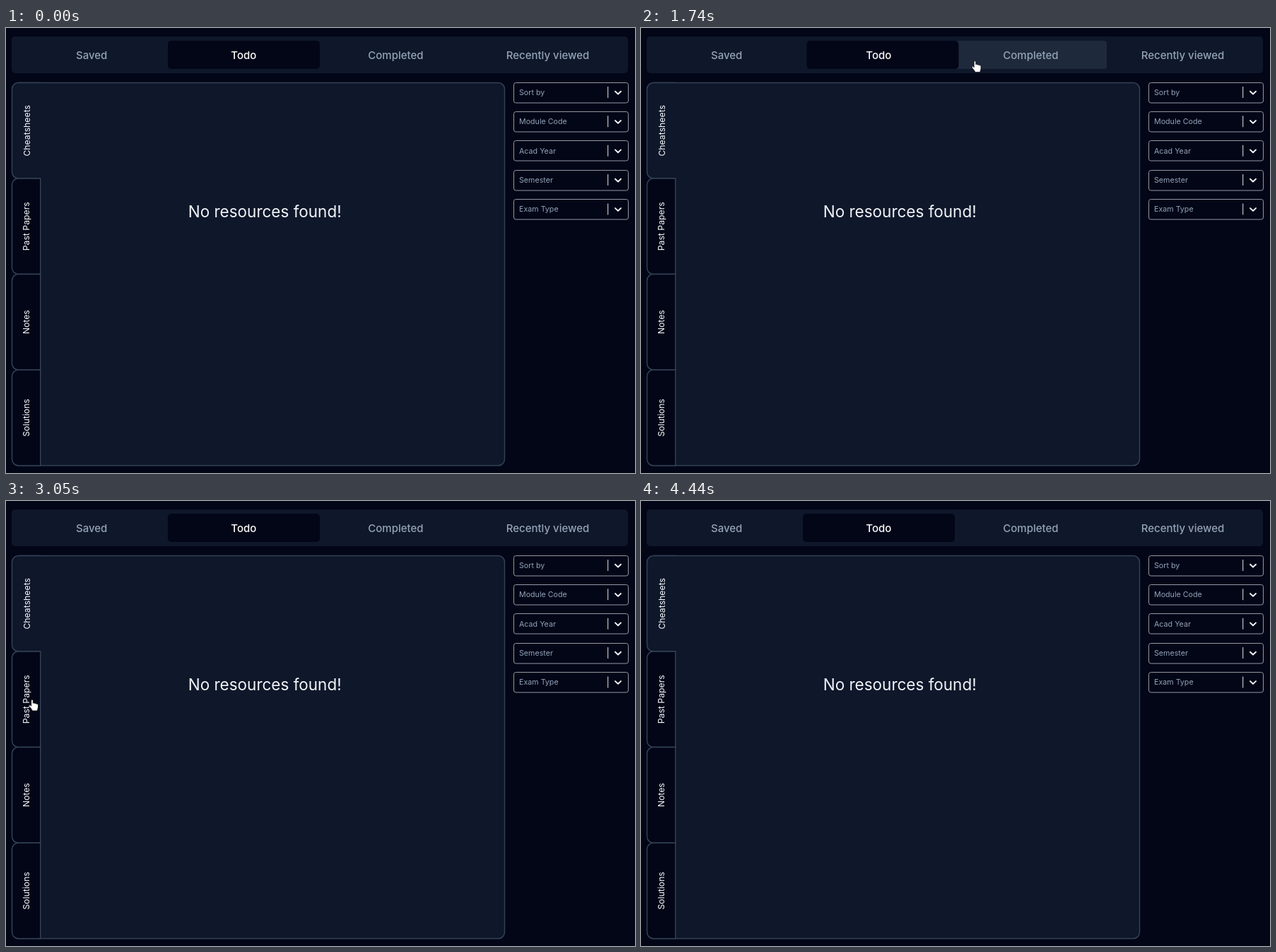
Animation of 890 by 630 pixels, one loop 5.11 s. Source, as an HTML page:

```html
<!DOCTYPE html>
<html lang="en">
<head>
<meta charset="utf-8">
<title>Resource tabs</title>
<style>
  html, body { margin: 0; width: 100%; height: 100%; overflow: hidden; background: #020617; }
  svg { display: block; width: 890px; height: 630px; font-family: Inter, sans-serif; }
</style>
</head>
<body>
<svg id="stage" viewBox="0 0 890 630"></svg>
<script>
const LOOP = 5110;
const PAGE = '#020617', PANEL = '#0f172a', HOVER = '#1e293b', LINE = '#334155';
const GREY = [148, 163, 184], WHITE = [255, 255, 255];
const stage = document.getElementById('stage');

function add(tag, attrs, parent = stage) {
  const el = document.createElementNS('http://www.w3.org/2000/svg', tag);
  set(el, attrs);
  parent.appendChild(el);
  return el;
}
function set(el, attrs) {
  for (const k in attrs) el.setAttribute(k, attrs[k]);
}
function label(str, attrs) {
  const el = add('text', attrs);
  el.textContent = str;
  return el;
}

// Top bar
add('rect', { x: 8, y: 12, width: 872, height: 52, rx: 5, fill: PANEL });
const hoverBox = [229, 444].map(x =>
  add('rect', { x, y: 18, width: 215, height: 40, rx: 4, fill: HOVER, opacity: 0 }));
const pill = add('rect', { x: 229, y: 18, width: 215, height: 40, rx: 5, fill: PAGE });
const tabText = ['Saved', 'Todo', 'Completed', 'Recently viewed'].map((s, i) =>
  label(s, { x: 121.2 + i * 215.1, y: 43.8, 'font-size': 15, 'font-weight': 500, 'text-anchor': 'middle', fill: `rgb(${GREY})` }));

// Main panel
add('rect', { x: 8.5, y: 77.5, width: 697, height: 542, rx: 9, fill: PANEL, stroke: LINE, 'stroke-width': 1.5 });
label('No resources found!', { x: 366.2, y: 268.2, 'font-size': 22.5, 'text-anchor': 'middle', fill: '#f1f5f9' });

// Side tabs
const sideTabs = ['Cheatsheets', 'Past Papers', 'Notes', 'Solutions'].map((s, i) => {
  const top = 77.5 + i * 135.5, bottom = top + 135.5;
  add('rect', { x: 7, y: top, width: 12, height: 135.5, fill: PAGE });
  const outline = `M49 ${top}H17.5a9 9 0 0 0 -9 9V${bottom - 9}a9 9 0 0 0 9 9H49`;
  const shape = add('path', { d: outline, stroke: LINE, 'stroke-width': 1.5 });
  const edge = add('path', { d: `M48.7 ${top - 0.7}V${bottom + 0.7}`, stroke: LINE, 'stroke-width': 1.5 });
  const text = label(s, { 'font-size': 12.25, 'text-anchor': 'middle', fill: '#f8fafc' });
  return { shape, edge, text, mid: top + 67.8 };
});

// Filters
['Sort by', 'Module Code', 'Acad Year', 'Semester', 'Exam Type'].forEach((s, i) => {
  const y = 91 + i * 41.35;
  const top = Math.round(y - 14.5) + 0.5;
  add('rect', { x: 718.5, y: top, width: 162, height: 28.5, rx: 3, fill: PAGE, stroke: '#a4a9b3', 'stroke-width': 0.9 });
  label(s, { x: 726, y: y + 3.9, 'font-size': 10.7, fill: '#94a3b8' });
  add('path', { d: `M851.7 ${y - 8}v16`, stroke: '#cbd5e1', 'stroke-width': 1.1 });
  add('path', { d: `M862 ${y - 1.3}l4 3.8l4 -3.8`, fill: 'none', stroke: '#f8fafc', 'stroke-width': 1.9, 'stroke-linecap': 'round', 'stroke-linejoin': 'round' });
});

// Pointer, drawn from its top left corner
const pointer = add('g', { fill: '#fff', stroke: '#05070d', 'stroke-width': 0.7, 'stroke-linejoin': 'round' });
const hand = add('path', { d: 'M3.2 1.6C3.2 -.1 5.7 -.1 5.8 1.6V5.3C6.5 4.6 8 4.8 8.2 5.8C9 5.2 10.4 5.5 10.6 6.5C11.6 6 13 6.5 13 7.8V11C13 12.6 12 13.6 11.8 16H4.8C4.4 13.8 1.8 11.8 .4 9.5C-.4 8 1.3 7.2 2.2 8.2L3.2 9.3Z' }, pointer);
const arrow = add('path', { d: 'M4.5 0V15L7.9 11.8L10.2 17L12.5 16L10.3 11H15Z' }, pointer);

// Pointer stops: time, x, y
const stops = [
  [230, 92, 307], [480, 330, 180], [750, 567, 35], [790, 566, 35],
  [1060, 506, 44.5], [1180, 484, 47], [1310, 462, 42], [1350, 458, 42], [1490, 440, 42],
  [1630, 440, 42], [1730, 468, 46.5], [2170, 466, 45], [2440, 320, 38], [2540, 319, 38.5],
  [2700, 170, 109], [2900, 45, 250], [3050, 32.5, 281], [3220, 27, 283], [3400, 27, 283],
  [3860, 21, 173], [4140, 21, 173], [4440, 143, 243]
];

const clamp = v => Math.max(0, Math.min(1, v));
const ramp = (t, start, len) => clamp((t - start) / len);
const window01 = (t, from, to) => ramp(t, from, 150) - ramp(t, to, 150);

function spring(ms) {
  if (ms <= 0) return 0;
  const zeta = 0.8, w = 0.015 * ms, damp = Math.sqrt(1 - zeta * zeta);
  return 1 - Math.exp(-zeta * w) * (Math.cos(damp * w) + zeta / damp * Math.sin(damp * w));
}

function pointerAt(t) {
  const i = stops.findIndex(s => s[0] > t);
  const [t0, x0, y0] = stops[i - 1], [t1, x1, y1] = stops[i];
  const u = (t - t0) / (t1 - t0);
  const k = 0.6 * u + 0.4 * u * u * (3 - 2 * u);
  return [x0 + (x1 - x0) * k, y0 + (y1 - y0) * k];
}

const mix = k => `rgb(${GREY.map((g, i) => Math.round(g + (WHITE[i] - g) * k))})`;

function draw(t) {
  pill.setAttribute('x', 229 + 215 * (spring(t - 1725) - spring(t - 2452)));
  const done = ramp(t, 1800, 150) - ramp(t, 2540, 150);
  tabText[1].setAttribute('fill', mix(1 - done));
  tabText[2].setAttribute('fill', mix(done));
  hoverBox[0].setAttribute('opacity', window01(t, 2400, 2600));
  hoverBox[1].setAttribute('opacity', window01(t, 700, 2250));

  const active = t >= 3350 && t < 3970 ? 1 : 0;
  sideTabs.forEach((tab, i) => {
    const on = i === active;
    tab.shape.setAttribute('fill', on ? PANEL : PAGE);
    tab.edge.setAttribute('visibility', on ? 'hidden' : 'visible');
    tab.text.setAttribute('transform', `translate(${on ? 34 : 33} ${tab.mid}) rotate(-90)`);
  });

  const shown = t >= 230 && t < 4440;
  pointer.setAttribute('visibility', shown ? 'visible' : 'hidden');
  if (shown) {
    const [x, y] = pointerAt(t);
    const clickable = y < 58 || x < 44;
    pointer.setAttribute('transform', `translate(${x.toFixed(2)} ${y.toFixed(2)})`);
    hand.setAttribute('display', clickable ? 'inline' : 'none');
    arrow.setAttribute('display', clickable ? 'none' : 'inline');
  }
}

const begin = performance.now();
function tick() {
  draw((performance.now() - begin) % LOOP);
  requestAnimationFrame(tick);
}
tick();
</script>
</body>
</html>
```
